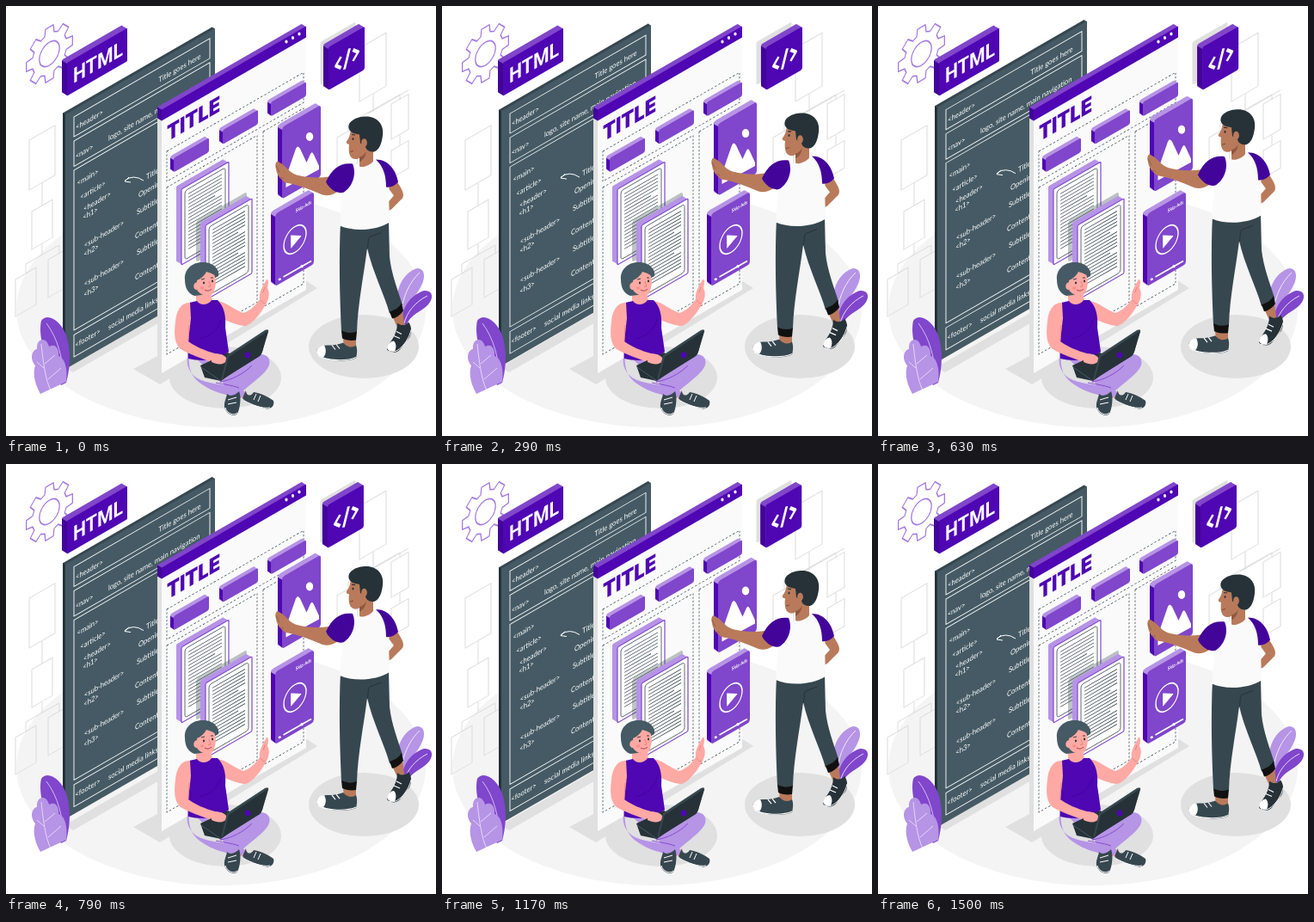
Write an HTML page that moves like this. It is 500 by 500 pixels and loops after 1540 ms.

```html
<!DOCTYPE html>
<html lang="en">
<head>
<meta charset="utf-8">
<title>Building a web page</title>
<style>
html, body { margin: 0; width: 100%; height: 100%; overflow: hidden; background: #fff; }
svg { display: block; width: 100%; height: 100%; }
text { text-anchor: middle; }
.note { font: 8.8px Lato, "Open Sans", sans-serif; fill: #fff; }
.from { text-anchor: start; }
.label { font: 700 24.5px Roboto, sans-serif; fill: #fff; }
.title { font: 900 25.3px Inter, sans-serif; fill: #4f06b3; }
.skip { font: 700 5.6px Lato, sans-serif; fill: #fff; }
</style>
</head>
<body>
<svg id="stage" viewBox="0 0 500 500" xmlns="http://www.w3.org/2000/svg"></svg>
<script>
const DARK = '#4f06b3', MID = '#8046cb', LIGHT = '#b694e6', DEEP = '#43049a';
const SLATE = '#37474f', INK = '#263238', BOARD = '#455a64', WHITE = '#fafafa';
const BROWN = '#b97a5b', PINK = '#ffa9a4', SHADE = '#e0e0e0';

// Everything upright stands on a wall seen in isometric view.
const wall = (x, y) => `transform="matrix(1 -.577 0 1 ${x} ${y})"`;
const shape = (d, fill, more = '') => `<path d="${d}" fill="${fill}" ${more}/>`;
const line = (d, color, w = 1, more = '') =>
  `<path d="${d}" fill="none" stroke="${color}" stroke-width="${w}" ${more}/>`;
const rect = (x, y, w, h, fill, r = 0, more = '') =>
  `<rect ${wall(x, y)} width="${w}" height="${h}" rx="${r}" fill="${fill}" ${more}/>`;
const oval = (x, y, rx, ry, fill) => `<ellipse cx="${x}" cy="${y}" rx="${rx}" ry="${ry}" fill="${fill}"/>`;
const words = (s, x, y, kind) =>
  `<text class="${kind}" transform="matrix(.866 -.5 0 1 ${x} ${y})">${s.replace(/</g, '&lt;')}</text>`;
const group = (id, inner) => `<g id="${id}">${inner}</g>`;

function box(x, y, w, h, d, face, side, top, r = 0, more = '') {
  const k = d * .577;
  let s = '';
  for (let i = d; i > 0; i--) s += rect(x - i, y - i * .577, w, h, top, r);
  s += shape(`M${x - d},${y - k + r}L${x},${y + r}V${y + h - r / 2}L${x - d},${y + h - k - r}Z`, side);
  return s + rect(x, y, w, h, face, r, more);
}

function wires() {
  const sheet = (x, y, w, h) => rect(x, y, w, h, 'none', 0, 'stroke="#dcdcdc"');
  return sheet(27, 156, 30, 58) + sheet(30, 239, 24, 44) + sheet(11, 318, 24, 43) + sheet(49, 295, 24, 44) +
    sheet(411, 49, 31, 62) + sheet(385, 153, 24, 43) + sheet(448, 114, 20, 41) + sheet(448, 168, 20, 32) +
    line('M42,206V232M42,277V289M23,311V300L62,278V287M427,102V123M398,146V137L458,103V109M421,125L468,98M458,150V162', '#dcdcdc');
}

function gear() {
  let d = '';
  for (let i = 0; i < 8; i++) {
    [[-.27, 23.5], [-.17, 31.5], [.17, 31.5], [.27, 23.5]].forEach(([o, r], j) => {
      const a = i * Math.PI / 4 + o;
      d += `${i + j ? 'L' : 'M'}${(r * Math.cos(a)).toFixed(1)},${(r * Math.sin(a)).toFixed(1)}`;
    });
  }
  return `<g transform="matrix(.866 -.5 0 1 50.5 55.5)" fill="#fff" stroke="#a57be0" stroke-width="1.5" stroke-linejoin="round">
    <path d="${d}Z"/><circle r="13.5"/></g>`;
}

function codeBoard() {
  const frame = (y, h) => rect(79, y, 158, h, 'none', 0, 'stroke="#fff" stroke-width=".9"');
  const tags = [['<header>', 97, 135], ['<nav>', 91, 172], ['<main>', 95, 202], ['<article>', 101, 217],
    ['<header>', 106, 230], ['<h1>', 98, 244], ['<sub-header>', 114, 268], ['<h2>', 99, 287],
    ['<sub-header>', 114, 313], ['<h3>', 99, 334], ['<footer>', 95, 389], ['Title goes here', 202, 75]];
  const copy = [['logo, site name, main navigation', 119, 157], ['Title', 163, 202], ['Opening', 154, 223],
    ['Subtitle', 152, 243], ['Content', 150, 271], ['Subtitle', 152, 290], ['Content', 150, 319],
    ['social media links', 119, 377]];
  return box(69, 126.3, 174, 296, 3, BOARD, INK, SLATE) +
    frame(129, 23) + frame(157, 29.5) + frame(191, 186) + frame(382.5, 25.5) +
    tags.map(t => words(...t, 'note')).join('') + copy.map(t => words(...t, 'note from')).join('') +
    line('M160,203Q148,195 138,203M143,199L138,204L145,205', '#fff');
}

function doc(x, y, w, h) {
  let rows = '';
  for (let i = 0; i < 17; i++) rows += `M8,${10 + i * 4}H${i % 6 == 5 ? w - 16 : w - 8}`;
  return box(x, y, w, h, 6, '#fff', LIGHT, LIGHT, 1.5, `stroke="${MID}" stroke-width="1.2"`) +
    rect(x + 4, y + 2, w - 8, h - 8, 'none', 3, `stroke="${SLATE}" stroke-width=".7"`) +
    line(rows, SLATE, .9, wall(x, y));
}

function page() {
  const dashed = (x, y, w, h) =>
    rect(x, y, w, h, 'none', 0, `stroke="${SLATE}" stroke-width=".8" stroke-dasharray="2.2 2"`);
  const button = (x, y) => box(x, y, 41, 16.5, 4, MID, DARK, LIGHT, 2);
  return shape('M176,129L181,132V427L176,424Z', SHADE) + rect(181, 121, 168, 306, WHITE) +
    box(181, 120.5, 168, 13, 5, DARK, DEEP, MID) +
    [[326, 41.5], [333.5, 37], [341, 32.5]].map(p => oval(...p, 1.6, 1.9, '#fff')).join('') +
    words('TITLE', 218, 140, 'title') +
    dashed(187, 169, 159, 35) + dashed(187, 211, 105, 194) + dashed(299, 146, 47, 204) +
    button(195, 177) + button(252, 144.5) + button(308, 112) +
    doc(204, 213, 55, 88) + rect(221, 250, 59, 48, SLATE, 3, 'opacity=".32"') + doc(232, 255, 54, 87);
}

function video() {
  return box(313, 242, 45, 84, 5, MID, DARK, LIGHT, 3) + words('Skip Ads', 346, 235, 'skip') +
    `<g transform="matrix(.866 -.5 0 1 336 271.5)"><circle r="15" fill="none" stroke="#fff" stroke-width="1.6"/>
     <path d="M-5,-7L8,0L-5,7Z" fill="#fff" stroke="#fff" stroke-linejoin="round"/></g>` +
    line('M317,318.5L319.5,317', '#fff', 2.5) + line('M322.5,315L355,296.5', '#fff', 1.6) +
    oval(344, 302.7, 1.6, 1.8, '#fff');
}

function picture() {
  return box(321, 141, 45, 83.5, 5, MID, DARK, LIGHT, 3) + oval(353, 152, 4.2, 5, '#fff') +
    shape('M325.5,211V199L337,166Q339,161 342,166L349.5,182L354,172Q356,168 358,173L364,186V190Z', '#fff');
}

function codeCard() {
  return box(375, 48, 42, 50, 6, DARK, DEEP, MID, 2) +
    line('M-8,-6L-15,1L-8,7M3.5,-10L-3.5,11M8,-6L15,0L8,7', '#fff', 3.5,
      'transform="matrix(.866 -.5 0 1 396.5 61)" stroke-linejoin="round"');
}

function leaves() {
  const vein = d => line(d, '#fff', .8, 'opacity=".8"');
  return shape('M64,441C45,414 37,383 41,366C48,356 65,366 71,386C76,404 74,423 70,438Z', MID) +
    vein('M47,369C60,386 67,411 67,438') +
    shape('M40,451C31,435 32,424 34,418C26,408 32,399 36,399C35,386 47,384 50,396C59,391 62,401 61,407C69,409 72,424 70,437Z', LIGHT) +
    vein('M41,393C43,413 46,435 52,447M45,416L57,406M49,434L64,421M44,421L36,414');
}

function rightLeaves() {
  return shape('M456,352C451,330 462,310 478,305C488,305 488,317 482,327C476,338 465,349 461,360Z', LIGHT) +
    line('M481,310C469,321 462,338 460,353', '#fff', .8) +
    shape('M460,371C459,352 470,336 486,331C496,330 498,339 491,347C483,356 472,357 466,370Z', MID) +
    line('M490,337C476,344 466,356 463,369', '#fff', .8);
}

function man() {
  return '<g transform="translate(0 1.5)">' +
    shape('M449,359L461,351L463,369L455,372Z', BROWN) + shape('M392,384H407V397L393,398Z', BROWN) +
    // back shoe
    shape('M455,367C460,371 465,370 468,366C472,371 472,379 469,384L458,398C454,403 446,402 443,398C443,391 455,384 455,367Z', INK) +
    shape('M443,396C444,391 448,388 451,388C454,391 454,396 452,400C448,401 444,400 443,396Z', '#fff') +
    line('M451,382L458,385M454,377L460,380', '#fff', 1.2) + line('M445,400C456,405 469,386 471,375', '#fff', 1) +
    // front shoe
    shape('M361,402C361,394 368,393 376,393C383,393 389,391 392,390C397,396 403,396 407,393C409,398 408,404 407,408C396,413 369,412 361,402Z', SLATE) +
    shape('M361,402C361,395 367,393 370,393C373,398 372,404 369,407C365,406 363,405 361,402Z', '#fff') +
    line('M379,393L383,398M384,392L388,397', '#fff', 1.2) + line('M363,405C373,411 396,412 407,407', '#fff', 1.1) +
    // trousers
    shape('M389,250C406,258 430,257 445,248L446,290C448,310 456,330 461,346L446,356C440,334 426,307 420,280C416,312 409,345 408,378C402,380 394,378 390,377C388,335 387,290 389,250Z', SLATE) +
    line('M420,281C422,275 420,271 423,267L436,262', INK) +
    shape('M390,376C396,379 404,379 408,377L407,387C401,388 395,387 391,385Z', '#111') +
    shape('M446,354C452,352 457,349 460,344L462,353C458,358 454,361 449,362Z', '#111') +
    // far arm, shirt
    shape('M442,207L455,203C460,211 464,217 461,222L448,235L442,238L443,228L451,219Z', BROWN) +
    shape('M403,183C410,189 424,183 428,177C439,177 446,183 447,192L445,215L446,250C430,260 404,261 388,254L391,215L390,190Z', WHITE) +
    shape('M430,177C444,177 453,188 456,203C452,208 446,210 442,209C442,196 439,185 430,177Z', DEEP) +
    shape('M376,197C362,199 349,198 338,195C331,193 327,187 322,183L316,179C313,180 313,184 314,188C315,195 319,200 325,204C340,206 353,212 368,218C378,221 388,214 394,207Z', BROWN) +
    line('M314,184L318,192M319,198L323,199', '#91583f', .8) +
    shape('M403,182C390,180 379,187 372,203C376,212 387,218 393,215C403,208 408,194 403,182Z', DEEP) +
    // head
    shape('M401,142C400,149 399,152 396,156C395,158 397,159 399,159.500C398,166 399,173 402,175C406,178 410,176 411,175V185C416,187 424,183 427,179V160L420,142Z', BROWN) +
    shape('M411,174C415,173 418,170 419,167C418,174 415,178 411,180Z', '#91583f') +
    shape('M399,142C396,133 407,127 419,127C432,127 440,137 438,149C437,158 434,166 428,168C422,168 419,166 418,162L412,158L411,148C406,147 401,146 399,142Z', INK) +
    oval(416.5, 157.5, 3.4, 4.8, BROWN) + oval(403.5, 153, 1, 1.5, INK) +
    line('M402,148L406,148.500', INK, 1.2) + line('M400,168L404,167', '#7c4530', .9) + '</g>';
}

function woman() {
  return shape('M268,443L279,449L284,455L279,459L268,452Z', PINK) + shape('M260,447L274,444L271,454L258,456Z', PINK) +
    // crossed legs
    shape('M250,434C266,424 285,405 296,405C306,405 310,414 303,423C295,433 282,441 273,450L258,448Z', LIGHT) +
    shape('M213,402C208,412 211,425 221,432C234,440 254,440 272,444L280,451L272,456C256,452 240,449 228,440C216,432 211,422 213,402L260,404L262,432L250,438Z', LIGHT) +
    line('M249,437C262,435 276,428 286,418M244,438C254,440 263,441 271,444', MID, .9) +
    // shoes
    shape('M257,451C261,455 267,452 271,448C274,455 272,469 269,474C265,478 258,475 255,469C252,463 256,457 257,451Z', SLATE) +
    line('M258,458L268,455M258,463L268,461', '#fff') + line('M255,467C257,474 265,477 269,473', '#fff', 1) +
    shape('M279,447C279,453 284,455 288,449C295,450 305,454 311,459C313,465 307,470 301,468C292,465 280,463 275,456Z', SLATE) +
    line('M291,451L288,458M296,453L293,460', '#fff') + line('M277,459C285,463 298,469 307,467', '#fff', 1) +
    // raised arm
    shape('M246,343C258,345 266,354 276,357C285,354 291,347 295,341C294,333 298,327 303,318C306,317 305,324 304,328C307,333 306,341 302,347C296,358 287,369 279,372C269,372 258,366 251,364Z', PINK) +
    line('M299,333L301,327M296,342C298,345 300,346 302,346', '#e57f7b', .8) +
    // body
    shape('M221,329L221,350L241,350L238,332Z', PINK) +
    shape('M213,345L222,343C226,349 235,348 239,342L246,342C253,349 256,358 255,374L259,402C245,414 225,413 212,410L209,372Z', DARK) +
    line('M250,365C246,378 237,384 225,387', DEEP, .9) +
    // near arm
    shape('M214,345C204,344 198,354 197,367C195,382 196,393 203,399C213,405 228,410 239,414C247,418 254,419 257,414C258,408 250,404 243,404C232,401 220,396 212,390L215,363Z', PINK) +
    line('M212,390L213,371', '#e57f7b', .8) +
    // laptop
    shape('M226,418L258,403L280,414L250,436L231,432Z', INK) + line('M227,420L250,436', BOARD, 1) +
    shape('M239,406C247,403 257,406 257,412C254,417 247,418 239,414Z', PINK) +
    shape('M257,406L301,377Q306,375 305,379L298,402Q297,405 295,407L250,435Z', SLATE) +
    shape('M259,408L304.5,378L298,402Q297,405 295,407L252,434Z', INK) + oval(281, 406, 3.4, 3.4, DARK) +
    // head
    shape('M208,318C207,307 216,298 228,298C240,297 249,306 247,314L242,317L236,335L219,337C211,334 208,327 208,318Z', BOARD) +
    shape('M222,319C227,317 231,313 233,309C239,311 243,312 243,315C245,322 243,332 239,336C233,339 225,335 222,330C217,330 217,322 222,321Z', PINK) +
    oval(230, 322, 1, 1.4, INK) + oval(240, 320, 1, 1.4, INK) +
    line('M227,318L231,317M238,316L241,316', INK, .9) + line('M236,320L238,326L235,326.500', '#e57f7b', .9) +
    line('M231,330C234,332 237,331 239,329', '#a83b4b', 1) + oval(228, 328, 2.2, 1.7, '#ff8d8b');
}

const stage = document.getElementById('stage');
stage.innerHTML =
  oval(250, 352.7, 238, 137.5, '#f4f4f4') + wires() +
  shape('M68,420L78,426L182,366V354Z', SHADE) + shape('M148,422L179,440L362,328L345,317Z', SHADE) +
  oval(416, 396, 64, 37, SHADE) + oval(255, 432, 65, 36, SHADE) +
  gear() + group('board', codeBoard()) +
  box(71, 66, 70, 38.5, 6, DARK, DEEP, MID, 1) + words('HTML', 107, 73.5, 'label') +
  leaves() + page() + video() + group('pic', picture()) +
  rect(365.5, 42, 41, 50, SHADE, 2) + group('code', codeCard()) +
  rightLeaves() + group('man', man()) + woman();

const LOOP = 1540, CYCLE = 1500, STEPS = 36;
const SHAKE = [0, -1, 2, -4, 4, -4, 4, -4, 2, -1, 0];
const floaters = ['board', 'pic', 'man'].map(id => document.getElementById(id));
const code = document.getElementById('code');

function draw(ms) {
  // 24 pictures a second, with a short rest at the end of the cycle
  const step = Math.min(STEPS, Math.floor((ms % LOOP + 4) * STEPS / CYCLE));
  const p = step / STEPS;
  const rise = -10 * (1 - Math.abs(2 * p - 1));
  floaters.forEach(g => g.setAttribute('transform', `translate(0 ${rise.toFixed(2)})`));
  const i = Math.min(9, Math.floor(p * 10 + 1e-9));
  const eased = 1 - Math.pow(Math.max(0, 1 - (p * 10 - i)), 1.4);
  const x = SHAKE[i] + (SHAKE[i + 1] - SHAKE[i]) * eased;
  code.setAttribute('transform', `translate(${x.toFixed(2)} 0)`);
}

let start;
function tick(now) {
  start ??= now;
  draw(now - start);
  requestAnimationFrame(tick);
}
draw(0);
requestAnimationFrame(tick);
</script>
</body>
</html>
```
